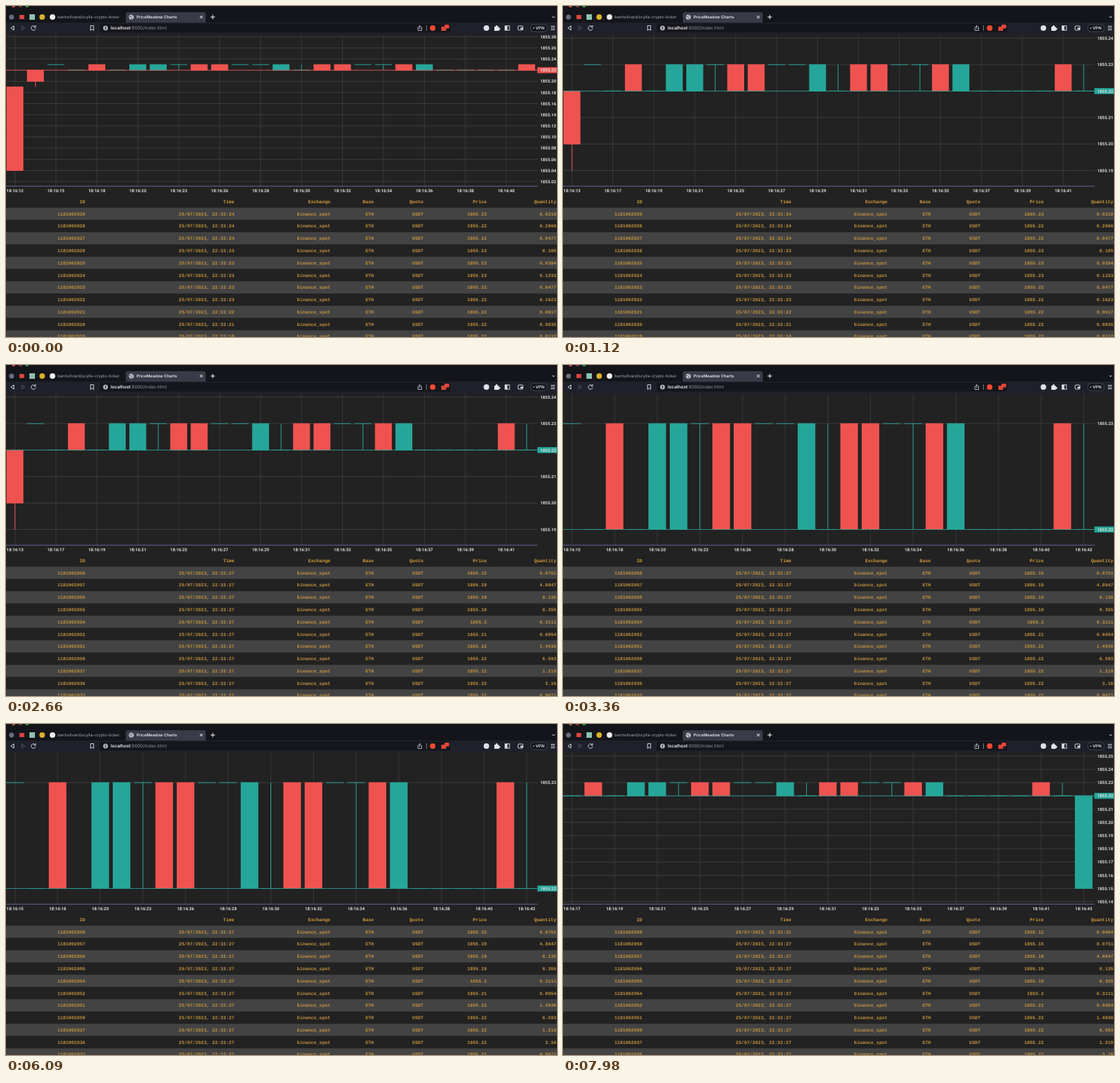
Recreate the animation shown at these times as an HTML page. Size 800 px wide and 480 px high, loop 8000 ms.

```html
<!DOCTYPE html>
<html lang="en">
<head>
<meta charset="utf-8">
<title>Live candles</title>
<style>
html, body { margin: 0; width: 100%; height: 100%; overflow: hidden; background: #222; }
svg { display: block; width: 800px; height: 480px; }
text { text-rendering: geometricPrecision; }
.ui { font-family: Inter, Roboto, sans-serif; fill: #e8e8ec; }
.axis { font: bold 6.2px Roboto, Arial, sans-serif; fill: #dcdcdc; text-anchor: middle; }
.table { font: bold 6.72px "Liberation Mono", "Courier New", monospace; fill: #c3923f; text-anchor: end; }
.head { fill: #d59b3c; }
.line { fill: none; stroke: #d6d6dc; stroke-width: 1; }
</style>
</head>
<body>
<svg viewBox="0 0 800 480">
  <rect width="800" height="480" fill="#222"/>
  <g id="chart"></g>
  <g id="table" class="table"></g>

  <!-- browser window -->
  <g class="ui">
    <rect width="800" height="41.5" fill="#1f212a"/>
    <rect width="800" height="24" fill="#14151b"/>
    <path d="M174 24V12q0-3 3-3h110q3 0 3 3v12z" fill="#393b48"/>
    <circle cx="11" cy="-.5" r="2.6" fill="#e0524a"/>
    <circle cx="21" cy="-.5" r="2.6" fill="#7d3a30"/>
    <circle cx="30.500" cy="-.5" r="2.6" fill="#2fa544"/>

    <circle cx="8" cy="16" r="3.6" fill="#6d6b82"/>
    <rect x="19.500" y="13" width="7" height="6" fill="#d9473f"/>
    <rect x="34" y="12" width="8" height="8" fill="#8dc2b0"/>
    <circle cx="52.500" cy="16" r="4" fill="#d9b02c"/>
    <circle cx="67.500" cy="16" r="4" fill="#f0f0f0"/>
    <svg x="75" y="9" width="94" height="15"><text y="9.300" font-size="5.9" fill="#a9aab3">benhollvard/scylla-crypto-ticker</text></svg>
    <circle cx="182" cy="16" r="3.600" fill="#c3c5cc"/>
    <path d="M179 15l3 1 1 3M182 13l2.500 2" class="line" style="stroke:#555864"/>
    <text x="189.500" y="18.300" font-size="5.800" font-weight="600">PriceMeadow Charts</text>
    <path d="M281.500 14l4 4m0-4l-4 4M297 16h6.400m-3.200-3.200v6.400" class="line" style="stroke:#fff"/>
    <path d="M793 15l2 2 2-2" class="line"/>

    <path d="M11.500 29v6l-4.500-3z" class="line"/>
    <path d="M23 29v6l4.500-3z" class="line" style="stroke:#50525c"/>
    <path d="M42.300 30a3.200 3.200 0 1 0 .700 2.500M43 28v2.700h-2.700" class="line"/>
    <path d="M122.800 28.500h4.400v7l-2.200-2-2.200 2z" class="line"/>
    <rect x="136" y="25.500" width="509" height="13" rx="2.500" fill="#15161c"/>
    <circle cx="144.500" cy="32" r="3.500" fill="#aeb0b8"/>
    <path d="M144.500 30v4" class="line" style="stroke:#24252c"/>
    <text x="152" y="34.300" font-size="6.500" fill="#92939c"><tspan font-weight="600" fill="#f2f2f4">localhost</tspan>:8000/index.html</text>
    <path d="M599.500 31h-1.500v4.500h5.500v-4.500h-1.500M600.700 33.500v-5l-1.500 1.500m1.500-1.500l1.500 1.500" class="line" style="stroke-width:.8"/>
    <path d="M610.500 28v8" class="line" style="stroke:#777a85"/>
    <circle cx="619.500" cy="32" r="4" fill="#ef4a33"/>
    <rect x="632" y="30" width="7" height="6" fill="#d94436"/>
    <rect x="636.500" y="27" width="7" height="5.500" rx="1.500" fill="#e8463c"/>
    <circle cx="697.500" cy="32" r="4" fill="#dfe0e8"/>
    <path d="M709 30h2a1.400 1.400 0 1 1 2.600 0h2v2a1.400 1.400 0 1 1 0 2.500v1.500h-6.600z" fill="#e6e6ea"/>
    <rect x="724.500" y="28.800" width="6.500" height="6.400" class="line"/>
    <rect x="725" y="29" width="3" height="6" fill="#d6d6dc"/>
    <rect x="743.500" y="29" width="7" height="6" rx="1" class="line"/>
    <rect x="747" y="31.500" width="4" height="2.500" fill="#d6d6dc"/>
    <rect x="762" y="26.800" width="23.500" height="10.400" rx="4" fill="#14151b" stroke="#555863" stroke-width=".7"/>
    <circle cx="766.300" cy="32" r="1.100" fill="#a6a8b0"/>
    <text x="769" y="34.200" font-size="6" font-weight="600">VPN</text>
    <path d="M791 29.500h6m-6 2.500h6m-6 2.500h6" class="line"/>
  </g>
</svg>
<script>
const LOOP = 8000;
const RED = '#ef5350', GREEN = '#26a69a';
const TOP = 85, BOTTOM = 238.5, PLOT_W = 772, AXIS_Y = 261.3;

// Prices are hundredths above 1855: [open, close, low, high]
const KINDS = {
  r: [23, 22, 22, 23], g: [22, 23, 22, 23],
  t: [23, 23, 23, 23], b: [22, 22, 22, 22],
  T: [23, 23, 22, 23], B: [22, 22, 22, 23],
  x: [19, 4, 4, 19], y: [22, 20, 19, 22], z: [15, 22, 15, 22]
};
const bars = [...'xytbrbggTrrttgBrrtTrgbbbbrBz'].map(k => KINDS[k]);
const seconds = [12, 13, 15, 17, 18, 19, 20, 21, 23, 25, 26];
while (seconds.length < bars.length) seconds.push(seconds.at(-1) + 1);

// First visible bar, number of bars, lowest and highest price label, label step
const views = [
  { at: 0, first: 0, count: 26, low: 2, high: 28, step: 2 },
  { at: 350, first: 1, count: 26, low: 19, high: 24, step: 1 },
  { at: 3010, first: 2, count: 25, low: 22, high: 23, step: 1 },
  { at: 7140, first: 3, count: 25, low: 14, high: 25, step: 1 }
];

// id, second, price, quantity
const earlyRows = [
  [29, 24, '23', '0.0219'], [28, 24, '22', '0.2866'], [27, 24, '22', '0.0477'],
  [26, 23, '23', '0.105'], [25, 23, '23', '0.0394'], [24, 23, '23', '0.1333'],
  [23, 23, '22', '0.0477'], [22, 23, '22', '0.1623'], [21, 22, '22', '0.0617'],
  [20, 21, '22', '0.9835'], [19, 18, '22', '0.0132']
];
const lateRows = [
  [58, 27, '15', '0.0751'], [57, 27, '19', '4.8647'], [56, 27, '19', '0.135'],
  [55, 27, '19', '0.355'], [54, 27, '2', '0.3111'], [52, 27, '21', '0.0054'],
  [51, 27, '22', '1.4936'], [50, 27, '22', '6.593'], [37, 27, '22', '1.219'],
  [36, 27, '22', '3.16'], [33, 27, '22', '0.9071']
];
const tables = [
  { at: 0, rows: earlyRows },
  { at: 1260, rows: lateRows },
  { at: 7140, rows: [[59, 31, '12', '0.0064'], ...lateRows.slice(0, 10)] }
];

const rect = (x, y, w, h, fill) => `<rect x="${x}" y="${y}" width="${w}" height="${h}" fill="${fill}"/>`;
const label = (x, y, s, cls = '') => `<text x="${x}" y="${y}" class="${cls}">${s}</text>`;
const price = p => '1855.' + String(p).padStart(2, '0');

function drawChart({ first, count, low, high, step }) {
  const shown = bars.slice(first, first + count);
  const gap = 743 / (count - 1);
  const floor = Math.min(...shown.map(b => b[2]));
  const x = i => 13 + gap * i;
  const y = p => TOP + (23 - p) * (BOTTOM - TOP) / (23 - floor);
  const color = b => b[1] < b[0] ? RED : GREEN;
  let out = '';

  for (let i = 0; i < count; i += 2) {
    out += rect(x(i) - .5, 41, 1, AXIS_Y - 41, '#393939');
    out += label(x(i), 270.4, '18:16:' + seconds[first + i], 'axis');
  }
  for (let p = low; p <= high; p += step) {
    out += rect(0, y(p) - .5, PLOT_W, 1, '#3d3d3d');
    out += label(787.3, y(p) + 2.2, price(p), 'axis');
  }

  const width = gap * .825;
  shown.forEach((bar, i) => {
    const [open, close, min, max] = bar;
    const top = y(Math.max(open, close));
    const height = Math.abs(y(open) - y(close));
    out += rect(x(i) - .5, y(max), 1, y(min) - y(max), color(bar));
    out += rect(x(i) - width / 2, top - .5, width, height + 1, color(bar));
  });

  const last = shown.at(-1), lastY = y(last[1]);
  out += `<g opacity=".8">${rect(0, lastY - .5, PLOT_W, 1, color(last))}</g>`;
  out += rect(0, AXIS_Y - .6, PLOT_W, 1.2, '#5f5688');
  out += rect(771.5, lastY - 4.3, 28.5, 8.6, color(last));
  return out + label(787.3, lastY + 2.2, price(last[1]), 'axis');
}

const columns = [115, 331.5, 471, 534, 606, 698, 799];
const cells = (values, y, cls) => values.map((v, i) => label(columns[i], y, v, cls)).join('');

function drawTable({ rows }) {
  let out = cells(['ID', 'Time', 'Exchange', 'Base', 'Quote', 'Price', 'Quantity'], 286, 'head');
  rows.forEach(([id, second, cents, quantity], i) => {
    const top = 292.5 + i * 17.78;
    out += rect(0, top, 800, 17.78, i % 2 ? '#222' : '#434343');
    out += cells(['11810020' + id, '25/07/2023, 22:33:' + second, 'binance_spot',
      'ETH', 'USDT', '1855.' + cents, quantity], top + 11.1);
  });
  return out;
}

function layer(id, states, draw) {
  const node = document.getElementById(id);
  let current;
  return t => {
    const state = states.findLast(s => s.at <= t);
    if (state !== current) node.innerHTML = draw(current = state);
  };
}

const layers = [layer('chart', views, drawChart), layer('table', tables, drawTable)];
const start = performance.now();
function frame() {
  const t = (performance.now() - start) % LOOP;
  layers.forEach(update => update(t));
  requestAnimationFrame(frame);
}
frame();
</script>
</body>
</html>
```
